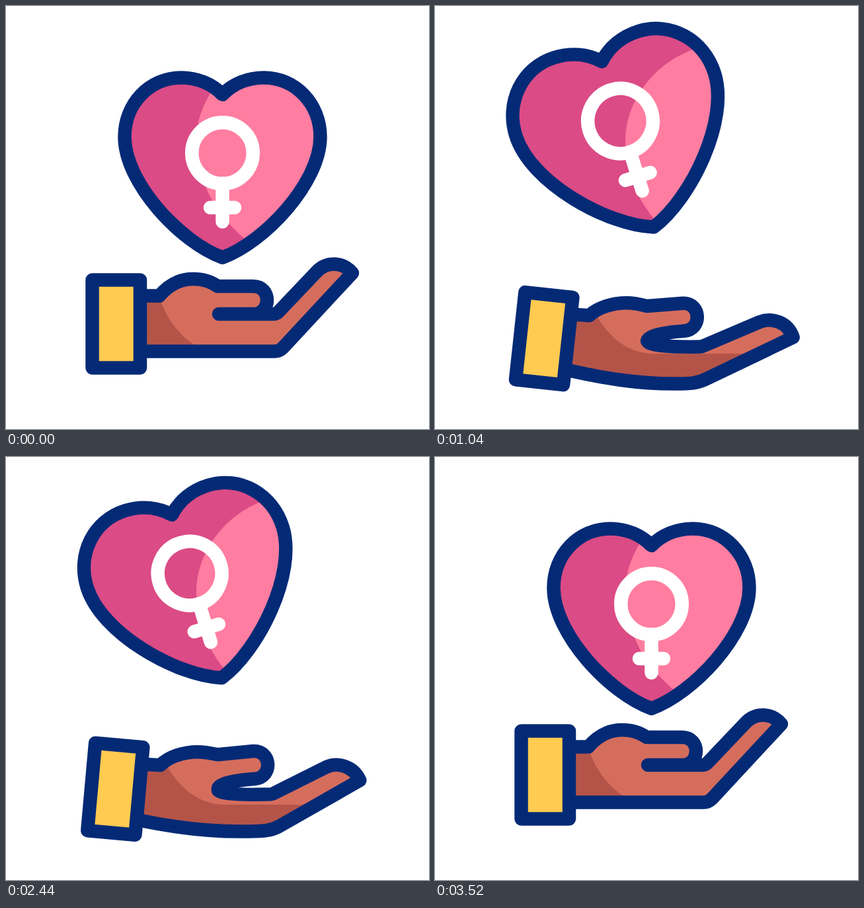
These frames come from a looping animation (640 px wide and 640 px high, 3.6 s). An HTML page:

```html
<!DOCTYPE html>
<html lang="en">
<head>
<meta charset="utf-8">
<title>Heart above an open hand</title>
<style>
  html, body { margin: 0; width: 100%; height: 100%; overflow: hidden; background: #fff; }
  svg { display: block; width: 100vw; height: 100vh; }
  .line { fill: none; stroke: #042a76; }
  .line, .sign, .spark {
    stroke-width: 20.5; stroke-linecap: round; stroke-linejoin: round;
    vector-effect: non-scaling-stroke;
  }
  .sign { fill: none; stroke: #fff; }
  .spark { stroke: #66ccd0; }
</style>
</head>
<body>
<svg viewBox="0 0 640 640">
  <defs>
    <path id="heartShape" d="M0-88.5C-15.5-104.5-37.5-114-62.5-114C-110.5-114-148-74.5-148-24.5C-148 45.5-62.5 135.5 0 158C62.5 135.5 148 45.5 148-24.5C148-74.5 110.5-114 62.5-114C37.5-114 15.5-104.5 0-88.5Z"/>
    <clipPath id="heartClip"><use id="heartMask" href="#heartShape"/></clipPath>
    <clipPath id="handClip"><path id="handMask"/></clipPath>
  </defs>

  <g clip-path="url(#handClip)">
    <path fill="#d56d5d" d="M0 0H640V640H0Z"/>
    <path fill="#b45449" d="M232 400V440C248 490 286 526 330 526H640V640H0V400Z"/>
  </g>
  <path id="hand" class="line"/>
  <path id="cuff" class="line" style="fill:#ffcb50" d="M130.5 414.5H203V547.5H130.5Z"/>

  <g clip-path="url(#heartClip)">
    <path fill="#db4b85" d="M0 0H640V640H0Z"/>
    <path fill="#ff7da0" d="M390 66C325 90 288 150 288 203C288 250 305 305 362 353H640V66Z"/>
  </g>
  <g id="heart">
    <path class="line" d="M0-88.5C-15.5-104.5-37.5-114-62.5-114C-110.5-114-148-74.5-148-24.5C-148 45.5-62.5 135.5 0 158C62.5 135.5 148 45.5 148-24.5C148-74.5 110.5-114 62.5-114C37.5-114 15.5-104.5 0-88.5Z"/>
    <circle class="sign" r="46.3"/>
    <path class="sign" d="M0 46V104M-18.5 82.5H18.5"/>
    <path id="sparks" class="spark"/>
  </g>
</svg>
<script>
const LOOP = 3600;
const $ = id => document.getElementById(id);

// Hand poses share one path structure, so their numbers can be blended.
const REST = 'M205 438.5L232 438.5C246 422 263 413 283 413C298 413 309 416 320 424L374 424C402 424 402 466 374 466C357 466 340 466 322 466C340 466 370 466 404 466C408 466 410 465 412 463L471 401C486 386 510 387 524 404L419 517C415 521 411 522.5 406 522.5C340 522.5 280 522.5 205 522.5';
const LOW = 'M205 470L234 472C247 460 270 454 291 454C302 454 311 456 321 458L375 453C403 452 405 493 377 495C350 497 321 502 321 512C321 519 345 523 400 522C402 522 403 522 405 521L494 488C513 482 537 490 544 514L408 571C395 577 385 578 357 578C300 578 250 568 202 555';
const HIGH = 'M205 440.5L232 439.5C246 422 263 411.5 283 411.5C297 411.5 308 413.5 318 418L371 413C399 411 401 453 373 455C345 457 322 458 321 463C322 464 360 463 404 459.5C407 459 409 458 411 455L450 389C460 373 485 373 504 385L431 508C426 514 420 516 412 516.5C340 522 280 526 205 525';
const numbers = path => path.match(/[\d.]+/g).map(Number);
const low = numbers(LOW), high = numbers(HIGH);

const TIMES = [160, 400, 680, 1040, 1840, 2310, 2440, 2780, 2960, 3500];
const TRACKS = {
  low:   [0, .375, .85, .885, 1, 1.04, .82, 0, 0, 0],
  high:  [0, 0, 0, 0, 0, 0, .25, 1, .35, 0],
  x:     [327.5, 314, 284, 280.5, 273, 264, 278, 319, 324.5, 327.5],
  y:     [222.5, 196, 176.5, 174, 172.5, 172.5, 176, 210.5, 218, 222.5],
  turn:  [0, -7.3, -16.2, -17.4, -20.2, -22, -17, -4.4, -1.6, 0],
  scale: [1, 1.025, 1.058, 1.065, 1.075, 1.08, 1.047, .952, .985, 1]
};

// Monotone cubic interpolation: smooth, without overshoot between keys.
function sample(values, t) {
  const last = TIMES.length - 1;
  if (t <= TIMES[0]) return values[0];
  if (t >= TIMES[last]) return values[last];
  const i = TIMES.findIndex(time => time > t) - 1;
  const rate = k => (values[k + 1] - values[k]) / (TIMES[k + 1] - TIMES[k]);
  const slope = k => {
    if (k === 0 || k === last) return 0;
    const a = rate(k - 1), b = rate(k);
    return a * b > 0 ? 2 * a * b / (a + b) : 0;
  };
  const span = TIMES[i + 1] - TIMES[i], u = (t - TIMES[i]) / span, v = 1 - u;
  return values[i] * v * v * (1 + 2 * u) + values[i + 1] * u * u * (3 - 2 * u)
    + span * u * v * (slope(i) * v - slope(i + 1) * u);
}

const progress = (t, from, to) => Math.min(1, Math.max(0, (t - from) / (to - from)));

function sparkPath(t) {
  const tail = progress(t, 2980, 3380), head = progress(t, 2720, 3040);
  if (head === 0 || tail === 1) return '';
  const lines = [[-137, -117, -133.5, -158.5], [-164.5, -96, -200.5, -116.5]];
  return lines.map(([x0, y0, x1, y1]) => [-1, 1].map(side => {
    const point = p => {
      const x = x0 + (x1 - x0) * p;
      return `${side < 0 ? x : 15 - x} ${y0 + (y1 - y0) * p}`;
    };
    return `M${point(tail)}L${point(head)}`;
  }).join('')).join('');
}

function draw() {
  const t = performance.now() % LOOP;
  const pose = {};
  for (const name in TRACKS) pose[name] = sample(TRACKS[name], t);

  let i = 0;
  const handPath = REST.replace(/[\d.]+/g, n => {
    const value = +n + pose.low * (low[i] - n) + pose.high * (high[i] - n);
    i++;
    return value.toFixed(2);
  });
  $('hand').setAttribute('d', handPath);
  $('handMask').setAttribute('d', handPath);
  $('cuff').setAttribute('transform',
    `translate(${-1.75 * pose.low} ${25 * pose.low + 3 * pose.high}) rotate(${7 * pose.low - 2.4 * pose.high} 166.75 481)`);

  const place = `translate(${pose.x} ${pose.y}) rotate(${pose.turn}) scale(${pose.scale})`;
  $('heart').setAttribute('transform', place);
  $('heartMask').setAttribute('transform', place);
  $('sparks').setAttribute('d', sparkPath(t));
  requestAnimationFrame(draw);
}
draw();
</script>
</body>
</html>
```
